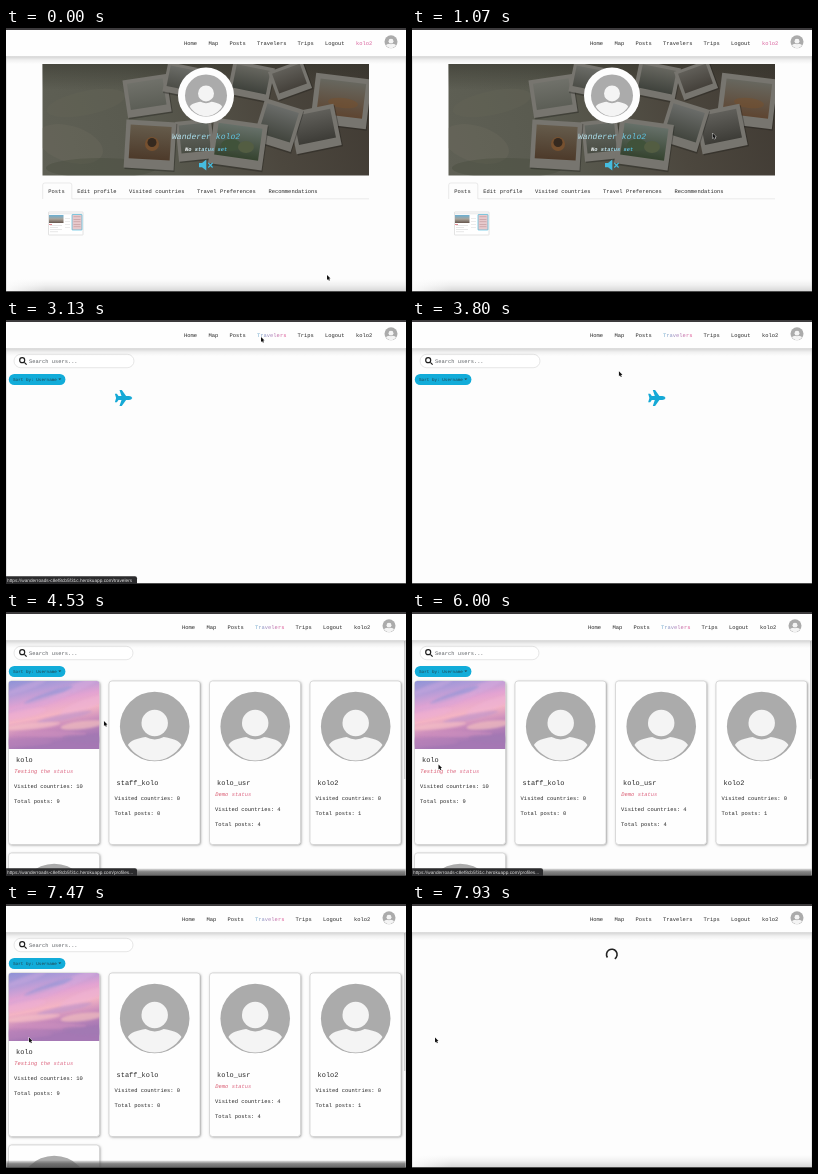
Recreate the animation shown at these times as an HTML page with a canvas. Size 400 by 264 pixels, loop 8000 ms.

```html
<!DOCTYPE html>
<html lang="en">
<head>
<meta charset="utf-8">
<title>Traveler profiles</title>
<style>
html, body { margin: 0; width: 100%; height: 100%; overflow: hidden; background: #fdfdfd; }
canvas { display: block; width: 400px; height: 264px; }
</style>
</head>
<body>
<canvas id="stage"></canvas>
<script>
const W = 400, H = 264, LOOP = 8000;
const MONO = '"Liberation Mono", "DejaVu Sans Mono", monospace';
const SANS = '"Liberation Sans", Roboto, sans-serif';
const BODY = 5.45, INK = '#262626', PINK = '#d9609c', CYAN = '#12acd9';
const USER = 'kolo2';

const canvas = document.getElementById('stage');
const ctx = canvas.getContext('2d');
const dpr = window.devicePixelRatio || 1;
canvas.width = W * dpr;
canvas.height = H * dpr;

// Page changes, in ms
const T = { travelers: 2470, link: 2700, linkEnd: 3650, cards: 3900, cardLink: 4200, cardLinkEnd: 6900, profile: 7600 };

// Pointer keys: time, x, y
const path = [
  [0, 321, 247], [250, 321, 247], [870, 318, 150], [1400, 272, 32], [1700, 257.5, 16.5],
  [2270, 257.5, 16.5], [2600, 255, 17], [3470, 255, 17], [4000, 178, 72], [4350, 124, 101],
  [4530, 98, 109], [5300, 52, 138], [5800, 26.5, 152.5], [6200, 26.5, 152.5],
  [6800, 23, 133.5], [8000, 23, 133.5]
];

const lerp = (a, b, k) => a + (b - a) * k;

function pointerAt(t) {
  let i = 1;
  while (i < path.length - 1 && t > path[i][0]) i++;
  const [t0, x0, y0] = path[i - 1], [t1, x1, y1] = path[i];
  const k = (t - t0) / (t1 - t0);
  return [lerp(x0, x1, k), lerp(y0, y1, k)];
}

function rect(x, y, w, h, fill) {
  ctx.fillStyle = fill;
  ctx.fillRect(x, y, w, h);
}

function disc(x, y, r, fill) {
  ctx.fillStyle = fill;
  ctx.beginPath();
  ctx.arc(x, y, r, 0, 7);
  ctx.fill();
}

function oval(x, y, rx, ry, fill, turn = 0) {
  ctx.fillStyle = fill;
  ctx.beginPath();
  ctx.ellipse(x, y, rx, ry, turn, 0, 7);
  ctx.fill();
}

function pill(x, y, w, h, r, fill, stroke) {
  ctx.beginPath();
  ctx.roundRect(x, y, w, h, r);
  if (fill) { ctx.fillStyle = fill; ctx.fill(); }
  if (stroke) { ctx.strokeStyle = stroke; ctx.lineWidth = 0.6; ctx.stroke(); }
}

function shade(x0, y0, x1, y1, ...colors) {
  const g = ctx.createLinearGradient(x0, y0, x1, y1);
  colors.forEach((c, i) => g.addColorStop(i / (colors.length - 1), c));
  return g;
}

// Set at ten times the size and scaled down, so advances stay fractional
function text(str, x, y, size = BODY, fill = INK, style = '', family = MONO) {
  ctx.save();
  ctx.translate(x, y);
  ctx.scale(0.1, 0.1);
  ctx.textRendering = 'geometricPrecision';
  ctx.font = `${style} ${size * 10}px ${family}`;
  ctx.fillStyle = Array.isArray(fill) ? shade(0, 0, ctx.measureText(str).width, 0, ...fill) : fill;
  ctx.fillText(str, 0, 0);
  ctx.restore();
}

function avatar(x, y, r) {
  const body = '#f4f4f4';
  disc(x, y, r, '#ababab');
  ctx.save();
  ctx.translate(x, y);
  ctx.scale(r, r);
  ctx.beginPath();
  ctx.moveTo(-0.77, 0.53);
  ctx.bezierCurveTo(-0.7, 0.4, -0.5, 0.34, -0.26, 0.3);
  ctx.quadraticCurveTo(0, 0.44, 0.26, 0.3);
  ctx.bezierCurveTo(0.5, 0.34, 0.7, 0.4, 0.77, 0.53);
  ctx.bezierCurveTo(0.6, 0.8, 0.3, 0.98, 0, 0.98);
  ctx.bezierCurveTo(-0.3, 0.98, -0.6, 0.8, -0.77, 0.53);
  ctx.fillStyle = body;
  ctx.fill();
  disc(0, -0.1, 0.38, body);
  ctx.restore();
}

function nav(active, shift) {
  rect(0, 28, W, 8, shade(0, 28, 0, 36, 'rgba(0,0,0,.18)', 'rgba(0,0,0,.05)', 'rgba(0,0,0,0)'));
  rect(0, 0, W, 28.2, '#fefefe');
  rect(0, 0, W, 2, '#3d3b3d');
  const items = [['Home', 178], ['Map', 202.5], ['Posts', 223.5], ['Travelers', 251],
    ['Trips', 291.5], ['Logout', 319], [USER, 350]];
  for (const [label, x] of items) {
    const on = label === active;
    const fill = !on ? INK : label === USER ? PINK : ['#70b0d0', '#ab82ba', '#e2508f'];
    text(label, x - shift, 17.3, BODY, fill);
  }
  avatar(385 - shift, 13.8, 6.5);
}

function print(x, y, w, h, turn, top, low) {
  ctx.save();
  ctx.translate(x, y);
  ctx.rotate(turn);
  rect(-w / 2 + 1, -h / 2 + 1.5, w, h, 'rgba(25,24,20,.35)');
  rect(-w / 2, -h / 2, w, h, '#77756f');
  rect(-w * 0.41, -h * 0.4, w * 0.82, h * 0.7, shade(0, -h * 0.4, 0, h * 0.3, top, low));
  ctx.restore();
}

function banner() {
  ctx.save();
  ctx.beginPath();
  ctx.rect(36.5, 36, 326.5, 111.5);
  ctx.clip();
  rect(36, 36, 328, 112, shade(36, 148, 363, 36, '#5f6055', '#595a4f', '#4c473e', '#403a33'));
  rect(36, 36, 328, 26, shade(0, 36, 0, 62, 'rgba(50,50,42,.5)', 'rgba(50,50,42,0)'));
  oval(80, 75, 40, 12, 'rgba(100,100,86,.35)', -0.2);
  oval(64, 116, 34, 18, 'rgba(112,110,98,.3)', 0.3);
  oval(95, 140, 55, 10, 'rgba(72,75,62,.4)');
  print(141, 68, 44, 38, -0.15, '#70716a', '#5c5e56');
  print(176, 52, 34, 30, 0.2, '#6a6b66', '#4c4d47');
  print(245, 53, 42, 34, 0.2, '#66665f', '#3f423c');
  print(284, 52, 36, 30, -0.35, '#605e58', '#45413b');
  print(335, 73, 56, 50, 0.12, '#67675f', '#5e4531');
  oval(337, 75, 15, 5, 'rgba(120,80,45,.5)', 0.12);
  print(309, 101, 46, 42, -0.2, '#605f5a', '#3d3c37');
  print(272, 97, 40, 44, 0.3, '#6a6c69', '#42453e');
  print(189, 112, 36, 40, -0.1, '#646862', '#4b4e45');
  print(144, 117, 50, 48, 0.06, '#655b4b', '#4d3a2a');
  disc(146, 116, 7, '#76502f');
  disc(146, 114.5, 4.5, '#35291f');
  print(232, 116, 54, 46, 0.14, '#667069', '#35432f');
  oval(225, 117, 10, 6, '#40523a');
  oval(240, 119, 8, 6, '#535d42');
  ctx.restore();
}

function muteIcon() {
  const c = '#45bde0';
  ctx.fillStyle = c;
  ctx.beginPath();
  [[193, 135], [196, 135], [200.3, 131.6], [200.3, 142.6], [196, 139.3], [193, 139.3]]
    .forEach(p => ctx.lineTo(...p));
  ctx.fill();
  ctx.strokeStyle = c;
  ctx.lineWidth = 1.1;
  ctx.beginPath();
  ctx.moveTo(202.3, 135);
  ctx.lineTo(206.6, 139.5);
  ctx.moveTo(206.6, 135);
  ctx.lineTo(202.3, 139.5);
  ctx.stroke();
}

function thumbnail() {
  pill(42.5, 184, 34.5, 23, 0.5, '#fff', '#d0d0d0');
  rect(43, 185, 33.5, 1.4, '#eeeeee');
  rect(43, 187, 14.5, 8, shade(0, 187, 0, 195, '#69b0d4', '#aaa49a', '#65564d'));
  for (let i = 0; i < 4; i++) {
    rect(44, 197 + i * 2.2, 12 - i % 2 * 4, 0.5, '#d0d0d0');
    rect(59, 190 + i * 3, 5, 0.5, '#d8d8d8');
  }
  rect(43, 196, 3, 0.8, '#d86a75');
  pill(66, 186.5, 10, 15.5, 0.5, '#e7c9cc', '#35b4d8');
  for (let i = 0; i < 5; i++) rect(67.5, 188.5 + i * 2.5, 7, 0.6, '#bf9699');
}

function profilePage() {
  banner();
  disc(200, 67.5, 28, '#fdfdfd');
  avatar(200, 67.5, 21);
  text('Wanderer', 166, 111, 8.1, ['#bfe6f0', '#93d6e8'], 'italic');
  text(USER, 209.8, 111, 8.1, ['#7dcfe8', '#52c0e0'], 'italic');
  text('No status set', 179, 122.8, 5.4, ['#ffffff', '#a6dcec', '#45b8dd'], 'italic bold');
  muteIcon();
  rect(66, 170.6, 297, 0.6, '#dcdcdc');
  ctx.strokeStyle = '#dcdcdc';
  ctx.lineWidth = 0.6;
  ctx.beginPath();
  ctx.moveTo(36.7, 171);
  ctx.lineTo(36.7, 157);
  ctx.arcTo(36.7, 155, 39, 155, 2);
  ctx.lineTo(63.5, 155);
  ctx.arcTo(65.8, 155, 65.8, 157, 2);
  ctx.lineTo(65.8, 171);
  ctx.stroke();
  [['Posts', 42.3], ['Edit profile', 71.3], ['Visited countries', 123],
    ['Travel Preferences', 191], ['Recommendations', 262.5]]
    .forEach(([label, x]) => text(label, x, 164.8));
  thumbnail();
}

function searchBar(width) {
  pill(8, 34.3, width, 13.4, 6.7, '#fff', '#d6d6d6');
  ctx.strokeStyle = '#1d1d1d';
  ctx.lineWidth = 1.2;
  ctx.beginPath();
  ctx.arc(16.2, 40.2, 2.5, 0, 7);
  ctx.moveTo(18.1, 42.1);
  ctx.lineTo(20.6, 44.6);
  ctx.stroke();
  text('Search users...', 23, 43, 5.4, '#5e6266');
  pill(2.8, 54, 56.6, 11, 5.5, CYAN);
  text('Sort by: Username', 7, 61, 4.3, '#20414d');
  ctx.fillStyle = '#20414d';
  ctx.beginPath();
  ctx.moveTo(52.3, 58.5);
  ctx.lineTo(55.3, 58.5);
  ctx.lineTo(53.8, 60);
  ctx.fill();
}

function plane(x, y) {
  ctx.save();
  ctx.translate(x, y);
  ctx.fillStyle = '#16a9d6';
  ctx.beginPath();
  ctx.moveTo(8.8, 0);
  ctx.quadraticCurveTo(8, -2, 5.5, -2);
  ctx.lineTo(2.6, -2);
  ctx.lineTo(-1.7, -8);
  ctx.lineTo(-4, -8);
  ctx.lineTo(-2, -2);
  ctx.lineTo(-5, -2);
  ctx.lineTo(-6.6, -4.2);
  ctx.lineTo(-8.6, -4.2);
  ctx.lineTo(-7.4, 0);
  ctx.lineTo(-8.6, 4.2);
  ctx.lineTo(-6.6, 4.2);
  ctx.lineTo(-5, 2);
  ctx.lineTo(-2, 2);
  ctx.lineTo(-4, 8);
  ctx.lineTo(-1.7, 8);
  ctx.lineTo(2.6, 2);
  ctx.lineTo(5.5, 2);
  ctx.quadraticCurveTo(8, 2, 8.8, 0);
  ctx.fill();
  ctx.restore();
}

function sky(x, y, w, h) {
  ctx.save();
  ctx.beginPath();
  ctx.roundRect(x, y, w, h, [3, 3, 0, 0]);
  ctx.clip();
  rect(x, y, w, h, shade(x, y, x + w * 0.15, y + h, '#8f93d6', '#b39cd8', '#e3a3d2', '#f4b4c4', '#c78abb', '#a578b4'));
  const clouds = [
    [18, 6, 22, 3, '#c3a6dd', -0.35], [66, 7, 30, 4, '#d6a8dc', -0.4], [40, 14, 26, 3, '#8f97d8', -0.35],
    [30, 22, 34, 4, '#dba6d6', -0.3], [76, 24, 26, 5, '#efb2d4', -0.35], [14, 33, 24, 4, '#eeb0d2', -0.2],
    [56, 36, 28, 3, '#c096cc', -0.2], [24, 45, 28, 3, '#f8c4c6', -0.1], [74, 44, 22, 4, '#fac8c0', -0.12],
    [42, 53, 36, 3, '#cf8fbe', 0], [78, 58, 24, 4, '#a07ab2', 0.05], [14, 61, 30, 4, '#b27fb8', 0]
  ];
  ctx.globalAlpha = 0.6;
  ctx.filter = `blur(${dpr}px)`;
  for (const [cx, cy, rx, ry, c, turn] of clouds) oval(x + cx, y + cy, rx, ry, c, turn);
  ctx.restore();
}

function card(x, y, user) {
  ctx.save();
  ctx.shadowColor = 'rgba(0,0,0,.4)';
  ctx.shadowBlur = 2.5 * dpr;
  ctx.shadowOffsetX = ctx.shadowOffsetY = 0.8 * dpr;
  pill(x, y, 91, 163.5, 3, '#fff');
  ctx.restore();
  pill(x, y, 91, 163.5, 3, '#fefefe', '#c4c4c4');
  if (user.photo) sky(x, y, 91, 68);
  else avatar(x + 45.7, y + 45.5, 34.8);
  if (!user.name) return;
  let line = y + (user.photo ? 81 : 104);
  text(user.name, x + 7.6, line, 6.95);
  line += user.status ? 11.2 : 0;
  if (user.status) text(user.status, x + 5.8, line, BODY, ['#d64f65', '#e0708e'], 'italic');
  line += 14.8;
  text('Visited countries: ' + user.countries, x + 5.6, line);
  text('Total posts: ' + user.posts, x + 5.6, line + 14.8);
}

const users = [
  { name: 'kolo', status: 'Testing the status', countries: 10, posts: 9, photo: true },
  { name: 'staff_kolo', countries: 0, posts: 0 },
  { name: 'kolo_usr', status: 'Demo status', countries: 4, posts: 4 },
  { name: USER, countries: 0, posts: 1 }
];

function travelersPage() {
  searchBar(119);
  users.forEach((user, i) => card(2.5 + i * 100.5, 69, user));
  card(2.5, 241, {});
  rect(398, 29, 1.4, 138, '#d2d2d2');
}

function spinner(t) {
  const gap = (100 + (t - 7930) / 750 * 360) * Math.PI / 180;
  ctx.strokeStyle = '#222';
  ctx.lineWidth = 1.6;
  ctx.beginPath();
  ctx.arc(199.8, 50.5, 5.3, gap + Math.PI / 4, gap + Math.PI * 1.75);
  ctx.stroke();
}

function windowEdge(kind) {
  if (kind === 'soft') {
    rect(0, 251, W, 12, shade(0, 251, 0, 263, 'rgba(0,0,0,0)', 'rgba(0,0,0,.05)', 'rgba(0,0,0,.15)'));
    rect(0, 251, 40, 12, shade(0, 0, 40, 0, 'rgba(253,253,253,.9)', 'rgba(253,253,253,0)'));
  } else if (kind === 'dark') {
    rect(0, 256.5, W, 7, shade(0, 256.5, 0, 263, 'rgba(90,90,90,.15)', 'rgba(90,90,90,.75)', 'rgba(80,80,80,.85)'));
  }
  rect(0, 28, 0.4, 236, '#c4c4c4');
  rect(W - 0.4, 28, 0.4, 236, '#c4c4c4');
  rect(0, 263, W, 1, '#4c4c4c');
}

function statusBar(page) {
  pill(0, 256.3, 131, 7.7, [0, 2, 0, 0], '#2b2b2d');
  text('https://wanderroads-c8ef8cb5f31c.herokuapp.com/' + page, 1, 262, 4.75, '#dedede', '', SANS);
}

function pointer(x, y) {
  ctx.save();
  ctx.translate(x, y);
  ctx.scale(0.88, 0.88);
  ctx.beginPath();
  [[0, 0], [0, 5.6], [1.3, 4.5], [2.2, 6.5], [3.2, 6], [2.4, 4.1], [4, 4]]
    .forEach(p => ctx.lineTo(...p));
  ctx.closePath();
  ctx.strokeStyle = '#fff';
  ctx.lineWidth = 0.9;
  ctx.stroke();
  ctx.fillStyle = '#111';
  ctx.fill();
  ctx.restore();
}

function draw(t) {
  ctx.setTransform(dpr, 0, 0, dpr, 0, 0);
  rect(0, 0, W, H, '#fdfdfd');
  if (t < T.travelers) {
    profilePage();
    nav(USER, 0);
    windowEdge('soft');
  } else if (t < T.cards) {
    searchBar(120);
    plane(117.3 + (t - 3130) * 0.19, 78);
    nav('Travelers', 0);
    windowEdge();
  } else if (t < T.profile) {
    travelersPage();
    nav('Travelers', 2);
    windowEdge('dark');
  } else {
    spinner(t);
    nav('', 0);
    windowEdge('soft');
  }
  if (t >= T.link && t < T.linkEnd) statusBar('travelers');
  if (t >= T.cardLink && t < T.cardLinkEnd) statusBar('profiles...');
  pointer(...pointerAt(t));
}

const start = performance.now();
function tick() {
  draw((performance.now() - start) % LOOP);
  requestAnimationFrame(tick);
}
tick();
</script>
</body>
</html>
```
